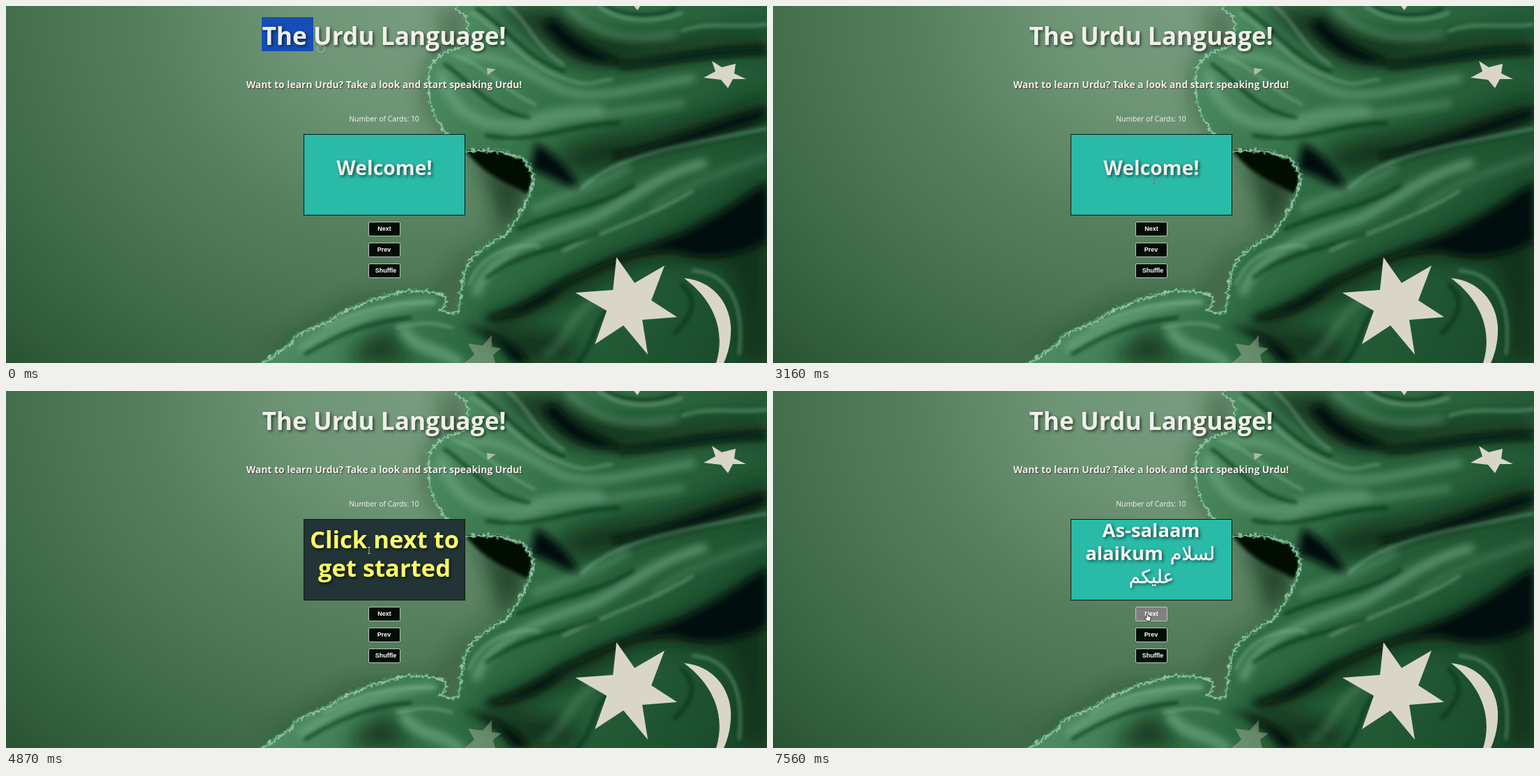
An HTML page that plays this animation: 1092 px wide and 513 px high, repeating every 7.99 s.

```html
<!DOCTYPE html>
<html lang="en">
<head>
<meta charset="utf-8">
<title>Urdu flash cards</title>
<style>
html, body { margin: 0; width: 100%; height: 100%; overflow: hidden; background: #3f6b49; }
#stage { position: absolute; left: 0; top: 0; width: 1092px; height: 513px; overflow: hidden; }
#stage > *, .card * { position: absolute; }
.bg { left: 0; top: 0; }
.t { line-height: 0; white-space: nowrap; transform: translateX(-50%);
  font-family: 'Open Sans', 'Noto Sans', sans-serif; font-weight: 700; color: #eff0ea; }
.title { left: 542.5px; top: 42.3px; font-size: 35.3px; text-shadow: 2px 2px 4px rgba(0,0,0,.6); }
.sub { left: 542.5px; top: 112.6px; font-size: 13.9px; text-shadow: 1px 1px 1px rgba(60,30,30,.75); }
.num { left: 542.5px; top: 161.5px; font-size: 10.4px; font-weight: 400; color: #f4f6f2; }
.lit { color: #fff; text-shadow: none; }
.sel { background: rgba(0,60,200,.8); }
.frame { left: 427px; top: 184px; width: 230px; height: 115px; border: 1px solid #0b1a12; }
.card { left: 427px; top: 184px; width: 232px; height: 117px; perspective: 480px; }
.inner { inset: 0; transform-style: preserve-3d; }
.face { inset: 0; box-sizing: border-box; backface-visibility: hidden; }
.front { background: #29baa8; }
.back { background: #223435; transform: rotateY(180deg); }
.still .face { border: 1px solid #0b1a12; }
.face .t { text-shadow: 2px 2px 4px rgba(0,0,0,.6); }
.front .t { font-size: 27.4px; color: #f8f8f5; }
.front .hi { font-size: 28.4px; color: #eff0ea; }
.front .ar { font: 400 26.5px/0 'DejaVu Sans', 'Noto Sans', sans-serif; -webkit-text-stroke: .5px #f8f8f5; }
.back .t { font-size: 34.6px; color: #ffff66; }
.btn { left: 520px; width: 44px; height: 19px; border: 1px solid #b9c7bc; border-radius: 2px; background: #020d05; }
.btn.over { background: #808080; }
.btn.down { background: #606060; }
.cap { font: 700 9px/0 'Liberation Sans', Arial, sans-serif; color: #fff; }
.ptr { left: 0; top: 0; overflow: visible; }
.ptr g { display: none; }
.ptr[data-k=i] { mix-blend-mode: difference; }
.ptr[data-k=i] .i, .ptr[data-k=a] .a, .ptr[data-k=h] .h { display: inline; }
.ring { left: 0; top: 0; width: 10px; height: 10px; margin: -6px; border: 1px solid #cfd8cf;
  border-radius: 50%; box-shadow: 0 0 0 .5px rgba(20,40,25,.5), inset 0 0 0 .5px rgba(20,40,25,.4); }
</style>
</head>
<body>
<div id="stage">
  <svg class="bg" width="1092" height="513" viewBox="0 0 1092 513">
    <defs>
      <radialGradient id="wall" gradientUnits="userSpaceOnUse" cx="0" cy="0" r="790"
        gradientTransform="translate(590 0) scale(1.16 1)">
        <stop offset="0" stop-color="#779c7e"/>
        <stop offset=".2" stop-color="#6d9575"/>
        <stop offset=".42" stop-color="#567f5d"/>
        <stop offset=".65" stop-color="#436e4c"/>
        <stop offset=".85" stop-color="#305b3a"/>
        <stop offset="1" stop-color="#1d4527"/>
      </radialGradient>
      <linearGradient id="silk" gradientUnits="userSpaceOnUse" x1="600" y1="120" x2="1092" y2="380">
        <stop offset="0" stop-color="#4d8a60"/>
        <stop offset=".4" stop-color="#2d6a41"/>
        <stop offset="1" stop-color="#1a4c2b"/>
      </linearGradient>
      <path id="edge" d="M646 -12 V0 C645 8 662 10 661 24 C660 40 664 55 642 60 C620 64 604 80 603 104
        C603 130 610 150 618 164 C632 185 645 203 660 207 C690 203 722 207 738 217 C752 230 760 244 752 258
        C745 280 730 308 714 327 C690 340 664 355 656 380 C648 400 654 420 646 436 Q634 442 622 434
        Q632 424 628 416 C612 405 570 404 545 414 C510 424 480 436 462 450 C445 460 422 464 412 476
        C400 492 380 498 350 525 H1110 V-12Z"/>
      <clipPath id="cloth"><use href="#edge"/></clipPath>
      <filter id="crisp" x="-20%" y="-20%" width="140%" height="140%"><feGaussianBlur stdDeviation="2.5"/></filter>
      <filter id="soft" x="-20%" y="-20%" width="140%" height="140%"><feGaussianBlur stdDeviation="6"/></filter>
      <filter id="haze" x="-20%" y="-20%" width="140%" height="140%"><feGaussianBlur stdDeviation="14"/></filter>
      <filter id="fray">
        <feTurbulence baseFrequency=".12" numOctaves="2" seed="4"/>
        <feDisplacementMap in="SourceGraphic" scale="9" xChannelSelector="R" yChannelSelector="G"/>
      </filter>
    </defs>
    <rect width="1092" height="513" fill="url(#wall)"/>
    <g filter="url(#haze)" fill="#143a20">
      <path opacity=".85" d="M660 207 C700 235 720 250 752 245 L735 300 L705 335 C712 290 690 250 660 207Z"/>
      <path opacity=".4" d="M650 0 L615 10 Q645 50 600 85 L600 150 L660 215 V0Z"/>
      <path opacity=".35" d="M715 320 L640 370 L620 410 L500 420 L360 500 L620 450Z"/>
    </g>
    <path filter="url(#crisp)" fill="#030f06" d="M658 206 C690 202 722 206 740 217 C756 232 760 250 748 270 C720 254 688 246 658 206Z"/>

    <g clip-path="url(#cloth)">
      <rect x="340" width="752" height="513" fill="url(#silk)"/>
      <g filter="url(#haze)" fill="#0a2a14" opacity=".8">
        <path d="M690 0 C730 20 760 62 810 82 C860 96 900 84 960 70 C1010 62 1050 60 1092 66 V40 C1030 36 980 44 920 44 C860 42 820 30 790 0Z"/>
        <path d="M790 210 C850 185 880 185 930 176 C1000 160 1050 140 1092 130 V172 C1020 186 960 200 900 216 C850 246 800 250 790 210Z"/>
        <path d="M690 445 C750 420 790 395 850 368 C940 330 1010 310 1092 250 V365 C1020 385 960 350 900 372 C850 400 790 440 690 465Z"/>
        <path d="M1030 380 C1062 410 1060 470 1056 513 H1092 V360Z"/>
        <path d="M660 462 C710 470 770 450 812 480 L820 513 H730 C715 485 690 472 660 462Z"/>
        <path d="M490 513 C505 480 535 470 552 462 C560 490 575 505 590 513Z"/>
      </g>
      <g filter="url(#soft)" fill="#031007">
        <path d="M770 24 C795 66 835 88 890 82 C850 66 812 50 788 18Z"/>
        <path d="M880 82 C930 78 970 62 1092 58 V68 C1010 70 950 86 880 90Z"/>
        <path d="M760 196 C790 214 812 236 824 264 C796 256 776 240 752 236Z"/>
        <path d="M870 212 C950 196 1010 168 1092 146 V160 C1020 186 960 204 870 220Z"/>
        <path d="M800 398 C850 364 930 346 980 322 C1030 298 1060 274 1092 254 V338 C1040 364 1000 366 960 352 C900 352 850 380 800 404Z"/>
        <path d="M650 457 C690 466 730 478 752 513 H728 C712 484 690 472 650 457Z"/>
        <path d="M690 446 C740 436 780 404 815 386 C790 424 750 446 690 452Z"/>
      </g>
      <g filter="url(#soft)" fill="none" stroke="#79b08b" stroke-linecap="round">
        <path d="M655 72 C710 64 750 100 800 122 C850 138 910 116 985 104" stroke-width="9" opacity=".65"/>
        <path d="M625 100 C640 150 680 180 740 168 C770 160 800 148 850 150" stroke-width="16" opacity=".5"/>
        <path d="M806 4 C850 45 900 52 960 40" stroke-width="8" opacity=".5"/>
        <path d="M720 190 C780 160 880 154 970 140" stroke-width="8" opacity=".5"/>
        <path d="M675 410 C700 350 770 330 840 306 C890 284 930 244 1000 226" stroke-width="13" opacity=".65"/>
        <path d="M760 290 C810 270 850 256 890 232" stroke-width="13" opacity=".4"/>
        <path d="M930 290 C980 250 1030 240 1092 216" stroke-width="8" opacity=".35"/>
        <path d="M425 492 C480 452 550 430 612 424" stroke-width="11" opacity=".65"/>
        <path d="M572 468 C590 496 620 490 650 513" stroke-width="17" opacity=".6"/>
        <path d="M775 500 C810 480 800 450 850 420" stroke-width="9" opacity=".35"/>
      </g>
      <g filter="url(#crisp)" fill="none" stroke-linecap="round">
        <g stroke="#8fc3a0" stroke-width="3" opacity=".6">
          <path d="M668 10 C710 34 735 78 790 100 S840 106 870 106"/>
          <path d="M720 0 C750 24 760 60 800 84"/>
          <path d="M850 0 C880 24 930 26 970 10"/>
          <path d="M970 36 C1010 20 1050 34 1092 26"/>
          <path d="M640 70 C690 84 710 120 760 142"/>
          <path d="M826 262 C870 220 940 204 1092 176"/>
          <path d="M664 400 C680 360 720 340 765 345"/>
          <path d="M800 352 C870 318 930 300 985 266"/>
          <path d="M455 462 C510 434 560 424 616 426"/>
          <path d="M560 462 C590 456 610 452 640 462"/>
          <path d="M985 380 C1040 384 1060 430 1052 500"/>
        </g>
        <g stroke="#0a2a14" stroke-width="5" opacity=".65">
          <path d="M676 4 C718 30 742 72 800 94"/>
          <path d="M860 0 C890 16 930 18 960 4"/>
          <path d="M630 84 C670 110 690 150 750 160"/>
          <path d="M690 186 C760 200 800 170 880 168"/>
          <path d="M735 320 C800 292 850 290 900 258"/>
          <path d="M690 390 C740 350 800 350 850 328"/>
          <path d="M430 500 C480 470 520 454 580 448"/>
          <path d="M820 513 C850 480 840 450 872 430"/>
          <path d="M960 470 C990 440 990 420 970 400"/>
        </g>
      </g>
      <g fill="#d9d6c8">
        <path d="M876 361 L902 398 945 373 926 423 963 447 913 451 921 501 886 459 845 486 862 438 817 412 871 408Z"/>
        <path d="M1013 79 L1027 88 1047 83 1045 97 1062 105 1043 105 1036 118 1026 106 1001 103 1018 94Z"/>
        <path d="M973 391 C1012 394 1038 425 1040 460 C1041 482 1036 500 1030 513 H1019 C1030 478 1025 430 973 391Z"/>
        <path d="M901 0 L906 6 910 0Z"/>
        <path d="M690 89 L703 91 691 99Z" opacity=".7"/>
        <path d="M663 485 L684 488 697 473 697 490 711 492 699 501 702 513 H658 L672 501Z" opacity=".35"/>
      </g>
    </g>
    <g fill="none" filter="url(#fray)">
      <use href="#edge" stroke="#4f8f68" stroke-width="6" opacity=".7"/>
      <use href="#edge" stroke="#a3d3b3" stroke-width="2.4" opacity=".8"/>
    </g>
  </svg>

  <div class="sel" id="s0" style="left:367px;top:16px;height:49px"></div>
  <div class="sel" id="s1" style="left:344px;top:101px;height:22px"></div>
  <div class="sel" id="s2" style="left:492px;top:153px;height:17px"></div>
  <div class="t title">The Urdu Language!</div>
  <div class="t sub">Want to learn Urdu? Take a look and start speaking Urdu!</div>
  <div class="t num">Number of Cards: 10</div>

  <div class="frame"></div>
  <div class="card"><div class="inner">
    <div class="face front">
      <div id="hello"><div class="t hi" style="left:115px;top:47px">Welcome!</div></div>
      <div id="salaam">
        <div class="t" style="left:114.5px;top:15px">As-salaam</div>
        <div class="t" style="left:76px;top:48px">alaikum</div>
        <div class="t ar" style="left:174px;top:49px" lang="ur">لسلام</div>
        <div class="t ar" style="left:115px;top:82px" lang="ur">علیکم</div>
      </div>
    </div>
    <div class="face back">
      <div class="t" style="left:115px;top:28px">Click next to</div>
      <div class="t" style="left:115px;top:69px">get started</div>
    </div>
  </div></div>

  <div class="btn" id="next" style="top:310px"></div>
  <div class="btn" style="top:340px"></div>
  <div class="btn" style="top:370px"></div>
  <div class="t cap" style="left:543px;top:320.2px">Next</div>
  <div class="t cap" style="left:542.5px;top:350.2px">Prev</div>
  <div class="t cap" style="left:545px;top:380.2px">Shuffle</div>

  <div class="ring"></div>
  <svg class="ptr" width="12" height="14">
    <g class="i"><path d="M-2 -4.5 H2 M-2 4.5 H2 M0 -4.5 V4.5" fill="none" stroke="#fff" stroke-width=".8"/></g>
    <g class="a"><path d="M0 0 V9.6 L2.2 7.6 3.7 11 5.3 10.3 3.8 7 H6.8Z" fill="#fff" stroke="#111" stroke-width=".7"/></g>
    <g class="h"><path d="M-1 1 Q0 -.6 1 1 V4.4 L4.6 5.2 Q5.4 5.6 5.2 7 L4.4 11.5 H-.4 L-3.4 7.4 Q-3 5.8 -1 7.2Z" fill="#fff" stroke="#111" stroke-width=".8"/></g>
  </svg>
</div>
<script>
const LOOP = 7990;
const TICKS = [0, 120, 240, 390, 510, 630, 750, 870, 1240, 1360, 1480, 1600, 1720, 1870, 2020, 2140, 2260,
  2410, 2530, 2650, 2800, 2920, 3040, 3160, 3660, 3910, 4060, 4180, 4300, 4450, 4600, 4720, 4870, 4990,
  5110, 5230, 5350, 5470, 5720, 5870, 5990, 6110, 6260, 6380, 6500, 6620, 6770, 6890, 7010, 7410, 7560];
// Pointer path: time, x, y.
const PATH = [[0, 452, 61], [240, 365, 95], [870, 658, 164], [1240, 657, 172], [1720, 649, 317],
  [1870, 654, 348], [2020, 654, 348], [2260, 685, 314], [2650, 622, 76], [2800, 600, 84],
  [3040, 534, 180], [3160, 547, 251], [3910, 547, 250], [4180, 547, 248], [4450, 547, 248],
  [4720, 526, 233], [4870, 521, 229], [5470, 487, 312], [5720, 501, 297], [5870, 504, 290],
  [6620, 504, 290], [7010, 537, 319], [LOOP, 537, 319]];
const PRESSES = [[0, 1240], [2020, 2140], [3660, 3910], [5870, 6110], [7410, 7560]];

const $ = q => document.querySelector(q);
const within = (t, a, b) => t >= a && t < b;
const bez = (u, a, b) => 3 * a * u * (1 - u) ** 2 + 3 * b * u * u * (1 - u) + u ** 3;

function ease(p) {
  if (p <= 0) return 0;
  if (p >= 1) return 1;
  let lo = 0, hi = 1;
  for (let n = 0; n < 24; n++) {
    const mid = (lo + hi) / 2;
    if (bez(mid, .25, .25) < p) lo = mid; else hi = mid;
  }
  return bez(lo, .1, 1);
}

function pointer(t) {
  const n = PATH.findIndex(k => k[0] > t);
  const [t0, x0, y0] = PATH[n - 1], [t1, x1, y1] = PATH[n];
  const p = (t - t0) / (t1 - t0);
  return [x0 + (x1 - x0) * p, y0 + (y1 - y0) * p];
}

function shape(t) {
  if (t >= 7010) return 'h';
  return t < 630 || within(t, 3160, 5230) ? 'i' : 'a';
}

function select(t, x) {
  const on = t < 2020;
  const widths = [
    t < 120 ? 74 : 361,
    t < 240 ? 0 : t < 750 ? x - 344 : 402,
    t < 750 ? 0 : 101
  ];
  widths.forEach((w, n) => $('#s' + n).style.width = (on ? w : 0) + 'px');
  $('.title').classList.toggle('lit', within(t, 120, 2020));
  $('.sub').classList.toggle('lit', within(t, 750, 2020));
}

function draw(now) {
  const clock = now % LOOP;
  const t = TICKS.filter(s => s <= clock).pop();
  const [x, y] = pointer(t);
  const place = `translate(${x}px, ${y}px)`;
  const angle = 180 * (ease((t - 3796) / 800) - ease((t - 6066) / 800));

  select(t, x);
  $('.inner').style.transform = `rotateY(${angle}deg)`;
  $('.card').classList.toggle('still', angle % 180 === 0);
  $('#hello').hidden = t >= 7560;
  $('#salaam').hidden = t < 7560;
  $('#next').classList.toggle('over', t >= 7010);
  $('#next').classList.toggle('down', within(t, 7410, 7560));
  $('.ptr').dataset.k = shape(t);
  $('.ptr').style.transform = place;
  $('.ring').style.transform = place;
  $('.ring').hidden = !PRESSES.some(([a, b]) => within(t, a, b));
}

function loop() {
  draw(performance.now());
  requestAnimationFrame(loop);
}
loop();
</script>
</body>
</html>
```
